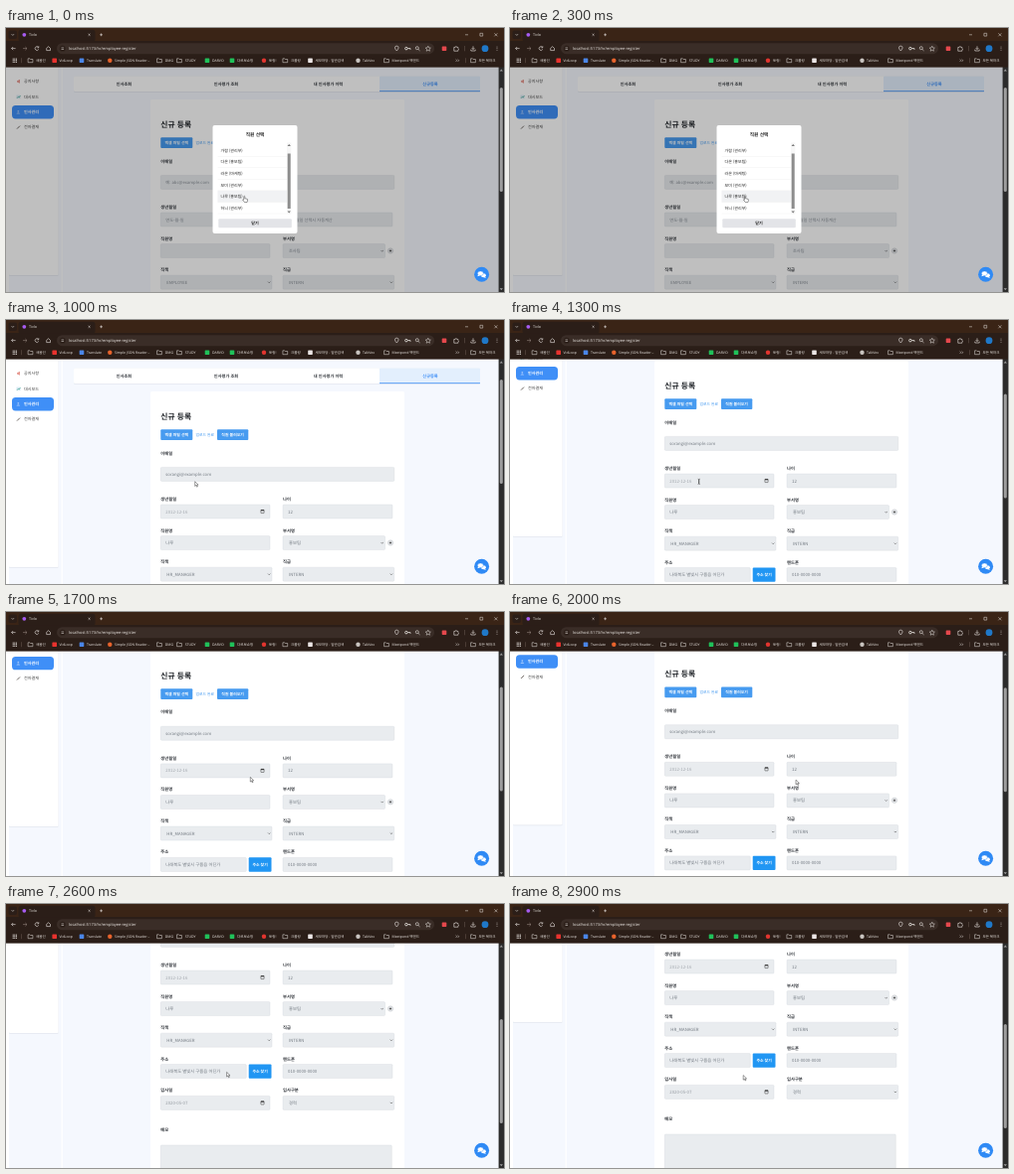
These frames come from a looping animation (500x266 px, 3 s). An HTML page:

```html
<!DOCTYPE html>
<html lang="ko">
<head>
<meta charset="utf-8">
<title>신규 등록</title>
<style>
html, body { margin: 0; height: 100%; overflow: hidden; background: #fff; }
svg { display: block; width: 100vw; height: 100vh; }
text { font-family: "Noto Sans CJK KR", "Noto Sans CJK", "Noto Sans", sans-serif; text-rendering: geometricPrecision; white-space: pre; }
.ui text { font-family: "Open Sans", "Noto Sans CJK KR", "Noto Sans CJK", sans-serif; }
</style>
</head>
<body>
<svg id="stage" viewBox="0 0 500 266"></svg>
<script>
const LOOP = 3000, STEP = 100, CLOSE_AT = 400;
const BLUE = '#479bf0', INK = '#30343a', PALE = '#eeeae6';
const FRAME = '#3a2416', TOOLBAR = '#2b1e18', INSET = '#3a2d27';

const rect = (x, y, w, h, fill, r = 0, more = '') =>
  `<rect x="${x}" y="${y}" width="${w}" height="${h}" rx="${r}" fill="${fill}" ${more}/>`;
const circle = (x, y, r, fill, more = '') => `<circle cx="${x}" cy="${y}" r="${r}" fill="${fill}" ${more}/>`;
const fillPath = (d, fill, more = '') => `<path d="${d}" fill="${fill}" ${more}/>`;
const line = (d, color, width = .6) => fillPath(d, 'none', `stroke="${color}" stroke-width="${width}"`);
// y is the vertical middle of the text
const text = (x, y, s, fill = INK, size = 4.3, more = '') =>
  `<text x="${x}" y="${(y + size * .36).toFixed(2)}" font-size="${size}" fill="${fill}" ${more}>${s}</text>`;
const centered = (x, y, s, fill, size) =>
  text(x, y, s, fill, size, 'text-anchor="middle" font-weight="700"');
const button = (x, y, w, h, s, fill = BLUE) =>
  rect(x, y, w, h, fill, 1) + centered(x + w / 2, y + h / 2, s, '#fff', 3.9);

function field(x, y, w, value, { empty = value, kind = '', h = 14, color = '#757c84' } = {}) {
  let out = rect(x, y, w, h, '#e9ecef', 1, 'stroke="#d5d9de" stroke-width=".4"');
  const pad = x + (kind === 'select' ? 6 : 5);
  out += text(pad, y + 7, empty, '#858b92', 4.2, 'class="before"');
  out += text(pad, y + 7, value, color, 4.3, 'class="after"');
  const r = x + w;
  if (kind === 'select') out += line(`M${r - 4} ${y + 6.4}l1.2 1.2 1.2-1.2`, '#555');
  if (kind === 'date') out += rect(r - 9.1, y + 5.4, 3.2, 3.2, 'none', .3, 'stroke="#333" stroke-width=".5"')
    + rect(r - 9.1, y + 5.2, 3.2, 1.1, '#333');
  return out;
}
const label = (x, y, s) => text(x, y, s, INK, 4.3, 'font-weight="700"');

function sidebar() {
  return rect(3, 30, 49.5, 219, '#fff', 1, 'filter="url(#soft)"')
    + fillPath('M11 53.2l3-1.4v4l-3-1.2z', '#e79a92')
    + text(18, 54, '공지사항', '#444', 4.1)
    + rect(10.5, 67.6, 4, 3.6, '#d8e8f2') + line('M11 70.8l1.2-1.5 1 .7 1.3-2', '#39a58e')
    + text(18, 69.5, '대시보드', '#444', 4.1)
    + rect(6, 78, 42, 13.4, '#3f8ff7', 3.6)
    + circle(12.3, 83.8, .9, '#9fc5fb') + fillPath('M10.4 86.6q1.9-2.6 3.8 0z', '#9fc5fb')
    + text(18, 84.7, '인사관리', '#fff', 4.1, 'font-weight="700"')
    + line('M11 101.6l3-3', '#6b6460', 1)
    + text(18, 100, '전자결재', '#444', 4.1);
}

function tabs() {
  const names = ['인사조회', '인사평가 조회', '내 인사평가 이력', '신규등록'];
  return rect(68, 48.5, 408, 15.5, '#fff', 1.5, 'filter="url(#soft)"')
    + rect(375, 48.5, 101, 15.5, '#e3effd', 1) + rect(375, 63.3, 101, .8, '#3f8ff7')
    + names.map((s, i) => centered(118.5 + i * 102.5, 56.3, s, i === 3 ? '#3f8ff7' : INK, 4.2)).join('');
}

function form() {
  const L = 155.3, R = 278;
  return rect(145, 72, 255, 420, '#fff', 1.5)
    + text(L, 97, '신규 등록', '#22262b', 7.8, 'font-weight="700"')
    + button(L, 110.3, 32, 10.7, '엑셀 파일 선택')
    + text(190.5, 115.7, '업로드 완료', BLUE, 3.8)
    + button(212, 110.3, 31.3, 10.7, '직원 불러오기')
    + label(L, 134, '이메일')
    + field(L, 148.4, 234.5, 'sorangi@example.com', { empty: '예: abc@example.com' })
    + label(L, 180.6, '생년월일') + label(R, 180.6, '나이')
    + field(L, 186, 109.7, '2012-12-16', { empty: '연도-월-일', kind: 'date', color: '#a3a8ae' })
    + field(R, 186, 110, '12', { empty: '생년월일 선택시 자동계산' })
    + label(L, 212, '직원명') + label(R, 212, '부서명')
    + field(L, 217.6, 109.7, '나루', { empty: '' })
    + field(R, 217.6, 102.5, '홍보팀', { empty: '조사팀', kind: 'select' })
    + circle(386, 224.5, 2.7, '#e4e6e9', 'stroke="#b9bdc2" stroke-width=".4"')
    + line('M384.8 224.5h2.4M386 223.3v2.4', '#222')
    + label(L, 243.6, '직책') + label(R, 243.6, '직급')
    + field(L, 249.2, 111.7, 'HR_MANAGER', { empty: 'EMPLOYEE', kind: 'select' })
    + field(R, 249.2, 111.7, 'INTERN', { kind: 'select' })
    + label(L, 275, '주소') + label(R, 275, '핸드폰')
    + field(L, 280.6, 86, '나래북도 별빛시 구름읍 어딘가')
    + button(243.7, 280.4, 22.8, 14.4, '주소 찾기', '#2196f3')
    + field(R, 280.6, 110, '010-0000-0000')
    + label(L, 306.8, '입사일') + label(R, 306.8, '입사구분')
    + field(L, 312.4, 109.7, '2020-05-07', { kind: 'date', color: '#959ba1' })
    + field(R, 312.4, 111.7, '경력', { kind: 'select' })
    + label(L, 346.4, '메모')
    + field(L, 362, 232, '', { h: 60 });
}

function modal() {
  const people = ['가람 (관리부)', '다온 (홍보팀)', '라온 (마케팅)', '보미 (관리부)', '나루 (홍보팀)', '하늬 (관리부)'];
  return rect(0, 39, 495, 227, '#000', 0, 'opacity=".25"')
    + rect(207.5, 98, 85, 109, '#fff', 2)
    + centered(250, 107.6, '직원 선택', '#222', 4.7)
    + rect(212.5, 164, 69.5, 11.4, '#f1f2f4')
    + people.map((s, i) => text(215.5, 123.5 + i * 11.55, s, '#222', 4, 'font-weight="500"')
      + rect(212.5, 129.1 + i * 11.55, 69.5, .3, '#e8e8e8')).join('')
    + rect(282, 115.5, 4.4, 72, '#f7f7f7') + rect(282.7, 126.5, 3, 55.5, '#8d8d8d')
    + fillPath('M282.5 119l1.7-2 1.7 2zM282.5 184.4l1.7 2 1.7-2z', '#777')
    + rect(213.3, 192.3, 73.5, 9, '#e3e4e8', 1)
    + centered(250, 196.8, '닫기', '#222', 4.1);
}

function chat() {
  const bubble = (x, y, rx, ry, more) => `<ellipse cx="${x}" cy="${y}" rx="${rx}" ry="${ry}" fill="#fff" ${more}/>`;
  return circle(477.6, 248.2, 7.5, '#2f8af5')
    + bubble(479.4, 249.3, 2.5, 2) + fillPath('M480.6 250.4l1.6 1.5-2.6-.6z', '#fff')
    + bubble(476.4, 247.3, 2.9, 2.3, 'stroke="#2f8af5" stroke-width=".4"')
    + fillPath('M474.2 248.2l-.9 2 2.6-.8z', '#fff');
}

function browser() {
  const folder = x => line(`M${x - 2.4} 30.8h1.8l.7.7h2.3v3.2h-4.8z`, PALE, .5);
  const dot = color => x => circle(x, 32.7, 2.2, color);
  const box = color => x => rect(x - 2.3, 30.5, 4.6, 4.4, color, .6);
  const bookmarks = [
    [24.5, folder, 30, '새봄인'], [48.7, box('#e8322e'), 53.5, 'VidLoop'],
    [76, box('#4a86e8'), 81, 'Translate'], [104.3, dot('#e8632c'), 109, 'Simple JSON Reader...'],
    [154, folder, 159.7, 'DMG'], [174, folder, 179.7, 'STUDY'],
    [202, box('#20c15a'), 207, 'DARVO'], [227, box('#20c15a'), 232, '다르보쇼핑'],
    [259, dot('#e3352f'), 264, '토링!'], [280.3, folder, 286, '크롤링'],
    [305.5, box('#ece6e6'), 310.5, '세모마당 - 일반검색'], [353.5, dot('#c9c4c0'), 358, 'TalkVex'],
    [382, folder, 387.5, 'Meetpond 백엔드'], [469, folder, 474.5, '모든 북마크']
  ];
  return '<g class="ui">'
    + rect(0, 0, 500, 14, FRAME) + rect(0, 13, 500, 26.6, TOOLBAR)
    + rect(2.5, 2.5, 8.5, 8.5, TOOLBAR, 2) + line('M5.6 6.2l1.2 1.2 1.2-1.2', PALE)
    + rect(12.5, 1.8, 77, 12, TOOLBAR, 2.5)
    + circle(18.3, 6.8, 1.9, '#a75cf2') + text(23, 6.8, 'Tivlo', PALE, 3.7)
    + line('M82.7 5.9l1.8 1.8m0-1.8l-1.8 1.8M94.2 6.8h2.8m-1.4-1.4v2.8', PALE)
    + line('M461 6.8h3M490.4 5.3l3 3m0-3l-3 3M475.9 5.3h2.8v2.8h-2.8z', PALE, .5)
    + line('M9.6 20.6h-4m1.6-1.6l-1.6 1.6 1.6 1.6', PALE)
    + line('M17 20.6h4m-1.6-1.6l1.6 1.6-1.6 1.6', '#94857e')
    + line('M32.6 19.4a1.9 1.9 0 1 0 .2 2M32.8 18.3v1.5h-1.5', PALE)
    + line('M40.7 20.4l1.9-1.7 1.9 1.7v2.2h-3.8z', PALE)
    + rect(51, 15.2, 379, 11, INSET, 5.5)
    + circle(56.8, 20.7, 2.9, TOOLBAR) + line('M55.5 19.9h2.6M55.5 21.5h2.6', PALE, .5)
    + text(63, 20.7, 'localhost:5173/hr/employee-register', PALE, 4)
    + line('M392.3 23q-1.8-2-1.8-3.1a1.8 1.8 0 0 1 3.6 0q0 1.1-1.8 3.1z', PALE)
    + circle(401.9, 20.6, 1.3, 'none', `stroke="${PALE}" stroke-width=".8"`) + line('M403.2 20.6h2.8v1.2', PALE, .8)
    + circle(412.8, 20.2, 1.5, 'none', `stroke="${PALE}" stroke-width=".6"`) + line('M413.9 21.3l1.6 1.6', PALE)
    + line('M423.8 18.2l.8 1.7 1.8.2-1.4 1.3.4 1.8-1.6-.9-1.6.9.4-1.8-1.4-1.3 1.8-.2z', PALE, .5)
    + rect(437.7, 18.4, 4.6, 4.6, '#e5484d', .7)
    + line('M449.8 19.4h1.3a.8.8 0 0 1 1.6 0h1.2v1.2a.8.8 0 0 1 0 1.5v1.1h-4.1z', PALE)
    + rect(460.6, 18, .4, 5.3, '#7c6a62')
    + line('M469 18.3v3.2m-1.4-1.4l1.4 1.4 1.4-1.4M466.8 21.6v1.4h4.4v-1.4', PALE)
    + circle(481, 20.7, 3.4, '#1f78c8')
    + [19, 20.7, 22.4].map(y => circle(493, y, .45, PALE)).join('')
    + [0, 1, 2].map(i => [0, 1, 2].map(j => rect(6.7 + i * 1.6, 30.6 + j * 1.6, 1, 1, PALE)).join('')).join('')
    + rect(15, 30.2, .4, 5, '#7c6a62') + rect(461, 30.2, .4, 5, '#7c6a62')
    + line('M451.6 31.5l1.2 1.2-1.2 1.2m2-2.4l1.2 1.2-1.2 1.2', PALE, .5)
    + bookmarks.map(([ix, icon, x, s]) => icon(ix) + text(x, 32.7, s, PALE, 3.5)).join('')
    + '</g>';
}

const cursors = `<g id="arrow">${fillPath('M0 0v4.6l1.1-1 .8 1.8.8-.4-.8-1.7h1.5z', '#fff', 'stroke="#222" stroke-width=".45"')}</g>
  <g id="hand">${fillPath('M0 .4q.5-.8 1 0v2.1l2.6.7q.6 1.8-.4 3.2h-2.4l-2-2.6q.3-.7 1.2 0z', '#fff', 'stroke="#222" stroke-width=".45"')}</g>
  <g id="beam">${line('M-1-2.6q1 0 1 .6v4q0 .6-1 .6M1-2.6q-1 0-1 .6v4q0 .6 1 .6', '#222', .5)}</g>`;

const stage = document.getElementById('stage');
stage.innerHTML = `<defs><filter id="soft" x="-10%" y="-10%" width="120%" height="120%">
  <feDropShadow dx="0" dy=".4" stdDeviation=".7" flood-color="#345" flood-opacity=".18"/></filter></defs>`
  + rect(3, 39, 492, 227, '#f5f8fe') + rect(55.6, 39, 1.2, 227, '#fff')
  + `<g id="page">${sidebar()}${tabs()}${form()}</g>`
  + `<g class="before">${modal()}</g>` + chat()
  + rect(494.6, 39, 5.4, 227, '#2c2c2c')
  + fillPath('M495.7 43.4l1.6-2 1.6 2zM495.7 262.2l1.6 2 1.6-2z', '#a0a0a0')
  + rect(495.8, 60, 3, 105, '#9f9f9f', 1.5, 'id="thumb"')
  + browser() + `<g id="pointer">${cursors}</g>`;

const get = id => document.getElementById(id);
const show = (el, on) => { el.style.display = on ? '' : 'none'; };
const before = stage.querySelectorAll('.before'), after = stage.querySelectorAll('.after');

// keys: [time, value]
const scrollKeys = [[1100, 0], [1300, 31], [2000, 34.7], [2200, 97], [2600, 119], [2900, 130]];
const xKeys = [[0, 238.8], [400, 234.5], [600, 234], [1000, 189.7], [1300, 189.7], [2000, 287], [2200, 287], [2600, 221.6], [2900, 234.2]];
const yKeys = [[600, 169.2], [1000, 162.8], [1300, 162.8], [2000, 169.2], [2600, 169.4], [2900, 172.6]];

function at(keys, t) {
  const i = keys.findIndex(k => k[0] >= t);
  if (i === 0) return keys[0][1];
  if (i < 0) return keys[keys.length - 1][1];
  const [t0, a] = keys[i - 1], [t1, b] = keys[i];
  return a + (b - a) * (t - t0) / (t1 - t0);
}

function draw(now) {
  const t = Math.floor(now % LOOP / STEP) * STEP;
  const open = t < CLOSE_AT, scroll = at(scrollKeys, t), inDate = t >= 1200 && t <= 1500;
  before.forEach(el => show(el, open));
  after.forEach(el => show(el, !open));
  get('page').setAttribute('transform', `translate(0 ${-scroll})`);
  get('thumb').setAttribute('y', 60 + scroll * .47);
  get('pointer').setAttribute('transform', `translate(${at(xKeys, t)} ${at(yKeys, t)})`);
  show(get('hand'), open);
  show(get('beam'), inDate);
  show(get('arrow'), !open && !inDate);
  requestAnimationFrame(() => draw(performance.now()));
}
draw(performance.now());
</script>
</body>
</html>
```
